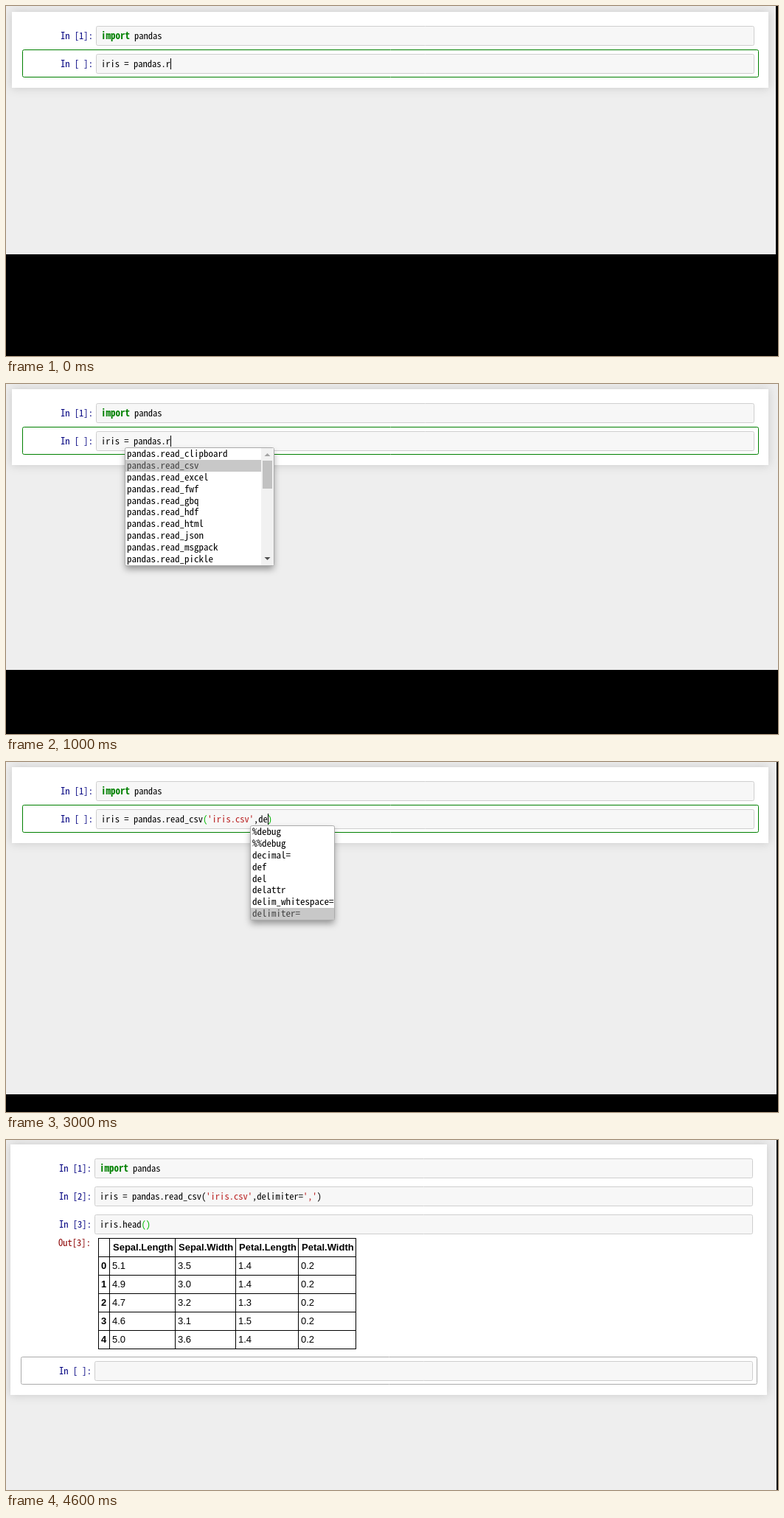
An HTML page with a canvas for the animation above (5 s loop, 1047 by 475 pixels).

```html
<!DOCTYPE html>
<html lang="en">
<head>
<meta charset="utf-8">
<title>Notebook completion</title>
<style>
html, body { margin: 0; width: 100%; height: 100%; overflow: hidden; background: #000; }
canvas { display: block; }
</style>
</head>
<body>
<canvas id="stage" width="1047" height="475"></canvas>
<script>
const ctx = document.getElementById('stage').getContext('2d');
const MONO = '"Noto Sans Mono CJK KR", "Noto Sans Mono CJK JP", monospace';
const CODE = `12.55px ${MONO}`, LIST = `13px ${MONO}`;
const SANS = '13px "Liberation Sans", Arial, sans-serif';
const RED = '#ba2121', MATCH = '#0b0', BLACK = '#000';
const ROW = 15.89;

function rect(x, y, w, h, fill) {
  ctx.fillStyle = fill;
  ctx.fillRect(x, y, w, h);
}

function frame(x, y, w, h, stroke, fill) {
  ctx.beginPath();
  ctx.roundRect(x + .5, y + .5, w - 1, h - 1, 2);
  if (fill) { ctx.fillStyle = fill; ctx.fill(); }
  ctx.strokeStyle = stroke;
  ctx.stroke();
}

function shadowed(color, blur, offsetY, draw) {
  ctx.save();
  ctx.shadowColor = color;
  ctx.shadowBlur = blur;
  ctx.shadowOffsetY = offsetY;
  draw();
  ctx.restore();
}

function text(string, x, y, color = BLACK, font = CODE) {
  ctx.font = font;
  ctx.fillStyle = color;
  ctx.fillText(string, x, y);
  return x + ctx.measureText(string).width;
}

// Tokens alternate between strings and the colours they are drawn in.
function cell(y, label, tokens = [], outline) {
  if (outline) frame(14, y - 6, 999, 38, outline);
  frame(114, y, 893, 27, '#cfcfcf', '#f7f7f7');
  text(`In [${label}]:`, 66, y + 18, '#000080');
  let x = 121;
  for (const [string, color] of tokens) x = text(string, x, y + 18, color);
}

function importCell() {
  cell(19, 1);
  text('import', 121, 37, '#008000', 'bold ' + LIST);
  text('pandas', 166, 37);
}

function triangle(x, y, dir, color) {
  ctx.fillStyle = color;
  ctx.beginPath();
  ctx.moveTo(x - 4, y);
  ctx.lineTo(x + 4, y);
  ctx.lineTo(x, y + 4 * dir);
  ctx.fill();
}

function popup({ x, w, items, selected, pad = 3, scroll }) {
  const y = 79, h = Math.round(items.length * ROW) + 2;
  shadowed('rgba(0,0,0,.4)', 9, 5, () => rect(x + 1, y + 1, w - 2, h - 2, '#fff'));
  frame(x, y, w, h, '#ababab', '#fff');
  const inner = w - (scroll ? 18 : 2);
  rect(x + 1, Math.round(y + 1 + selected * ROW), inner, 16, '#c8c8c8');
  items.forEach((item, i) =>
    text(item, x + pad, Math.round(y + 13 + i * ROW), i === selected ? '#444' : BLACK, LIST));
  if (!scroll) return;
  const bar = x + w - 18;
  rect(bar, y + 1, 17, h - 2, '#f1f1f1');
  rect(bar + 2, y + 18, 13, 38, '#c1c1c1');
  triangle(bar + 8.5, y + 12, -1, '#a3a3a3');
  triangle(bar + 8.5, y + h - 12, 1, '#505050');
}

function table() {
  const columns = [119, 134, 223, 305, 390, 468];
  const rows = [
    ['', 'Sepal.Length', 'Sepal.Width', 'Petal.Length', 'Petal.Width'],
    [0, '5.1', '3.5', '1.4', '0.2'],
    [1, '4.9', '3.0', '1.4', '0.2'],
    [2, '4.7', '3.2', '1.3', '0.2'],
    [3, '4.6', '3.1', '1.5', '0.2'],
    [4, '5.0', '3.6', '1.4', '0.2']
  ];
  for (const x of columns) rect(x, 127, 1, 151, BLACK);
  for (let r = 0; r <= rows.length; r++) rect(119, 127 + r * 25, 350, 1, BLACK);
  rows.forEach((row, r) => row.forEach((value, c) => {
    const heading = r === 0 || c === 0;
    const x = columns[c] + (r === 0 ? 5 : 4);
    text(value, x, 144 + r * 25, BLACK, (heading ? 'bold ' : '') + SANS);
  }));
}

const readers = ['clipboard', 'csv', 'excel', 'fwf', 'gbq', 'hdf', 'html', 'json', 'msgpack', 'pickle'];

const scenes = [
  { width: 1044, height: 337, top: 8, cursor: 215, code: [['iris = pandas.r']] },
  {
    width: 1047, height: 388, top: 7, cursor: 215, code: [['iris = pandas.r']],
    popup: { x: 153, w: 203, items: readers.map(name => 'pandas.read_' + name), selected: 1, scroll: true }
  },
  {
    width: 1044, height: 418, top: 10, cursor: 284,
    code: [['iris = pandas.read_csv('], ["'ir'", RED], [')']],
    popup: { x: 260, w: 57, items: ['iris.csv', 'iris.png'], selected: 0, pad: 4 }
  },
  {
    width: 1045, height: 451, top: 7, cursor: 347,
    code: [['iris = pandas.read_csv'], ['(', MATCH], ["'iris.csv'", RED], [',de'], [')', MATCH]],
    popup: {
      x: 323, w: 115, selected: 7,
      items: ['%debug', '%%debug', 'decimal=', 'def', 'del', 'delattr', 'delim_whitespace=', 'delimiter=']
    }
  },
  { width: 1045, height: 475, top: 6, left: 6, panel: 340, finished: true }
];

function results() {
  cell(57, 2, [['iris = pandas.read_csv('], ["'iris.csv'", RED], [',delimiter='], ["','", RED], [')']]);
  cell(95, 3, [['iris.head'], ['()', MATCH]]);
  text('Out[3]:', 65, 138, '#8b0000');
  table();
  cell(294, ' ', [], '#ababab');
}

function draw(scene) {
  rect(0, 0, 1047, 475, BLACK);
  ctx.save();
  ctx.beginPath();
  ctx.rect(0, 0, scene.width, scene.height);
  ctx.clip();
  rect(0, 0, scene.width, scene.height, '#eee');
  ctx.translate(scene.left ?? 8, scene.top);
  shadowed('rgba(87,87,87,.25)', 12, 0, () => rect(0, 0, 1026, scene.panel ?? 103, '#fff'));
  importCell();
  if (scene.finished) results();
  else {
    cell(57, ' ', scene.code, '#008000');
    rect(scene.cursor, 63, 1, 15, BLACK);
    if (scene.popup) popup(scene.popup);
  }
  ctx.restore();
}

function tick() {
  draw(scenes[Math.floor(performance.now() / 1000) % scenes.length]);
  requestAnimationFrame(tick);
}
tick();
</script>
</body>
</html>
```
